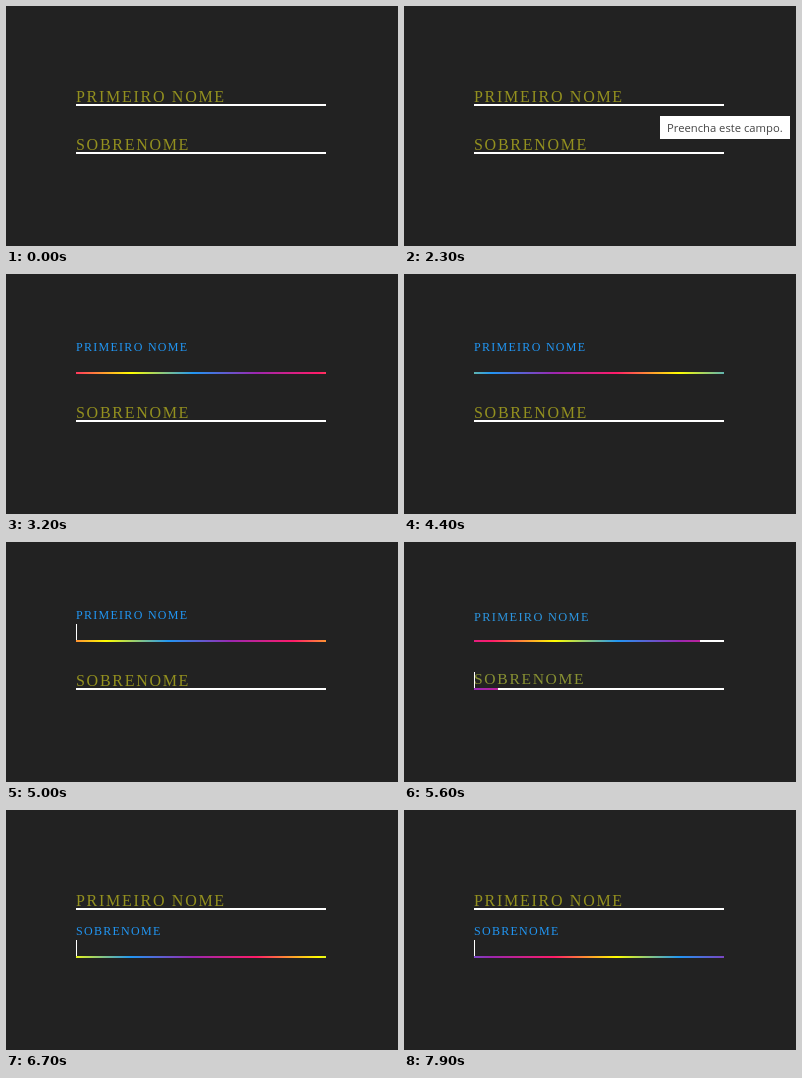
An HTML page for the animation above (8000 ms loop, 392 by 240 pixels).

```html
<!DOCTYPE html>
<html lang="pt">
<head>
<meta charset="utf-8">
<title>Campos de formulário</title>
<style>
  html, body {
    margin: 0;
    width: 100%;
    height: 100%;
    overflow: hidden;
    background: #222;
  }

  .field {
    position: absolute;
    left: 70px;
    width: 250px;
    height: 18px;
  }
  .first  { top: 82px;  --on: 2550; --off: 5550; --blinks: 3; }
  .second { top: 130px; --on: 5550; --off: 99999; --blinks: infinite; }

  svg {
    position: absolute;
    left: 0;
    top: 0;
    overflow: visible;
  }

  /* Every animation is paused and placed in time through --t (ms). */
  .label {
    font: 16px "Liberation Serif", "Times New Roman", serif;
    letter-spacing: .107em;
    fill: #93901f;
    animation: rise .5s ease forwards paused, sink .5s ease forwards paused;
    animation-delay:
      calc((var(--on) - var(--t)) * 1ms),
      calc((var(--off) - var(--t)) * 1ms);
  }

  .line {
    position: absolute;
    left: 0;
    top: 16px;
    width: 250px;
    height: 2px;
    background: #fff;
    overflow: hidden;
  }
  .rainbow {
    position: absolute;
    left: -250px;
    width: 250px;
    height: 2px;
    background: linear-gradient(90deg, #ff1b69, #ff0, #2196f3, #9c27b0, #ff1b69);
    animation:
      flow 2s linear infinite paused,
      enter .5s ease forwards paused,
      leave .5s ease forwards paused;
    animation-delay:
      calc(var(--t) * -1ms),
      calc((var(--on) - var(--t)) * 1ms),
      calc((var(--off) - var(--t)) * 1ms);
  }

  .caret {
    position: absolute;
    left: 0;
    top: 0;
    width: 1px;
    height: 16px;
    background: #fff;
    opacity: 0;
    animation: blink 1060ms step-end var(--blinks) paused;
    animation-delay: calc((var(--on) - var(--t)) * 1ms);
  }

  .tip {
    position: absolute;
    left: 256px;
    top: 110px;
    width: 130px;
    height: 23px;
    background: #fff;
    opacity: 0;
    animation: show 250ms paused;
    animation-delay: calc((2300 - var(--t)) * 1ms);
  }
  .tip text {
    font: 11.25px "Open Sans", "Noto Sans", sans-serif;
    fill: #444;
  }

  @keyframes rise {
    to { font-size: 12px; fill: #2196f3; transform: translateY(-19px); }
  }
  @keyframes sink {
    from { font-size: 12px; fill: #2196f3; transform: translateY(-19px); }
    to { font-size: 16px; fill: #93901f; transform: translateY(0); }
  }
  @keyframes flow {
    from { background-position-x: 92.5px; }
    to { background-position-x: 342.5px; }
  }
  @keyframes enter { to { left: 0; } }
  @keyframes leave { from { left: 0; } to { left: -250px; } }
  @keyframes blink { 0% { opacity: 1; } 50%, 100% { opacity: 0; } }
  @keyframes show { from, to { opacity: 1; } }
</style>
</head>
<body style="--t: 0">
  <div class="field first">
    <svg width="250" height="18"><text class="label" x="0" y="14">PRIMEIRO NOME</text></svg>
    <div class="line"><div class="rainbow"></div></div>
    <div class="caret"></div>
  </div>
  <div class="field second">
    <svg width="250" height="18"><text class="label" x="0" y="14">SOBRENOME</text></svg>
    <div class="line"><div class="rainbow"></div></div>
    <div class="caret"></div>
  </div>
  <div class="tip">
    <svg width="130" height="23"><text x="7" y="16">Preencha este campo.</text></svg>
  </div>

<script>
  const LOOP = 8000;
  const STEP = 100;
  const start = performance.now();

  function tick() {
    const time = (performance.now() - start) % LOOP;
    document.body.style.setProperty('--t', Math.floor(time / STEP) * STEP);
    requestAnimationFrame(tick);
  }
  tick();
</script>
</body>
</html>
```
